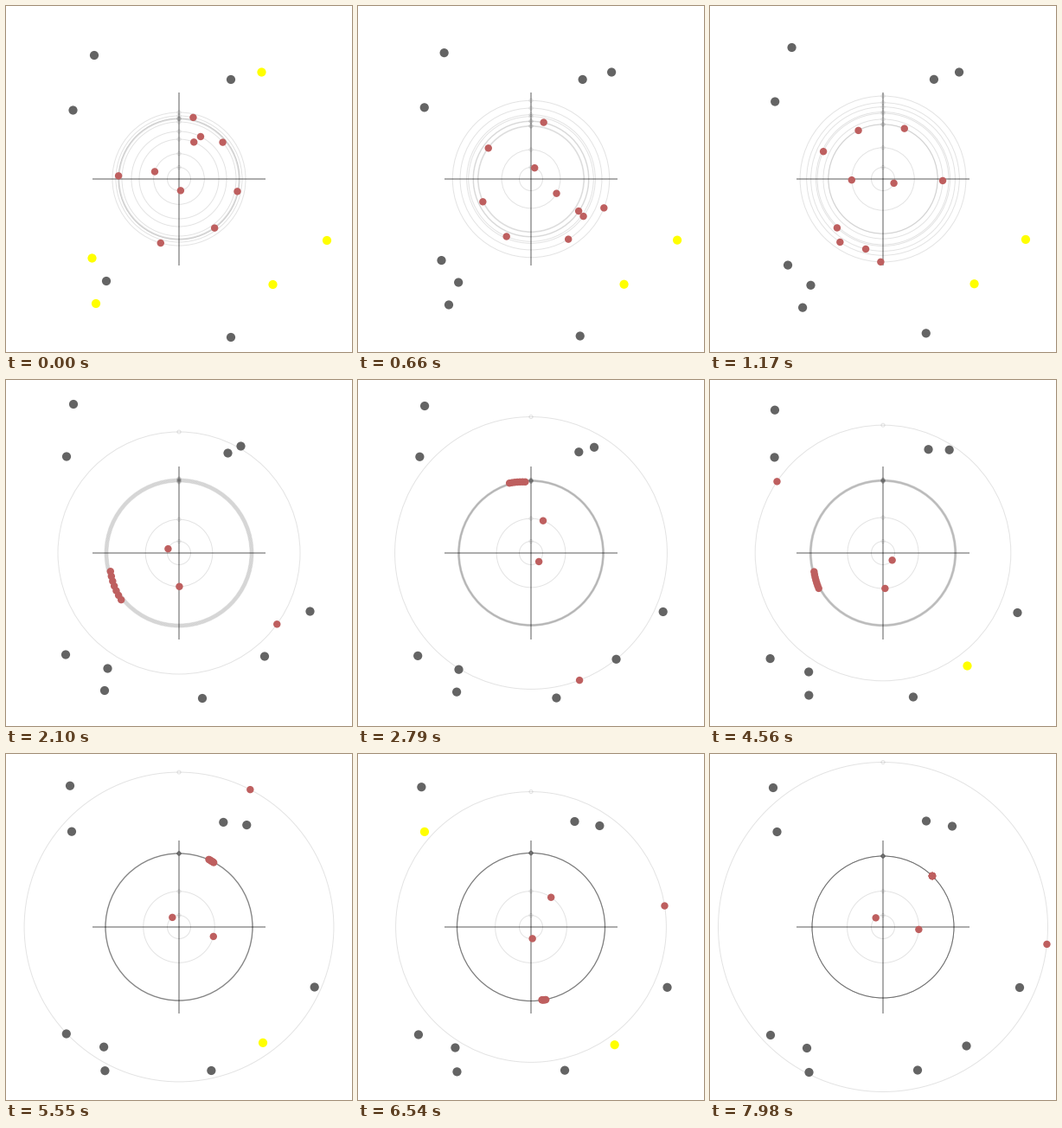
A matplotlib script for the animation above (8000 ms loop, 400x400 px).

```python
import numpy as np
import matplotlib.pyplot as plt
from matplotlib.animation import FuncAnimation
from matplotlib.patches import Circle

SIZE, DPI = 400, 100
PX = 72 / DPI
MID = SIZE / 2
FRAMES, INTERVAL, TICK = 250, 32, 30
SETTLE, END = 2100, 7980

GREY, YELLOW, RED = "#646464", "#ffff00", "#be5f5f"
BEATS = [0, 1170, SETTLE, 3540, 4560, 6540, END]


def curve(times, values):
    """Smooth cubic path through the given keys."""
    times, values = np.array(times, float), np.array(values, float)
    slopes = np.gradient(values, times)

    def at(t):
        i = int(np.clip(np.searchsorted(times, t, "right") - 1, 0, len(times) - 2))
        h = times[i + 1] - times[i]
        u = np.clip((t - times[i]) / h, 0, 1)
        return ((1 + 2 * u) * (1 - u) ** 2 * values[i] + u * (1 - u) ** 2 * h * slopes[i]
                + u * u * (3 - 2 * u) * values[i + 1] + u * u * (u - 1) * h * slopes[i + 1])
    return at


inner_angle = curve(BEATS, [82, 1101, 2001, 3150, 3998, 5843, 7072])
outer_angle = curve(BEATS, [-254, -67, 36, 103, 214, 351, 366])
outer_reach = curve(BEATS[:5] + [5250] + BEATS[5:],
                    [77, 63.4, 140, 155.5, 147.8, 178, 156.4, 190.5])
swarm_angle = curve(BEATS, [-162, 14, 153, 373, 518, 800, 1034])
swarm_reach = curve(BEATS[2:], [84, 83.2, 83.7, 85.5, 82])


# Orbits return angle in degrees (clockwise) and radius in pixels
def inner(t):
    return inner_angle(t), 13.5


def second(t):
    return 197 + 0.2916 * t, 41.5 - 12.2 * np.exp(-t / 1400)


def outer(t):
    return outer_angle(t), outer_reach(t)


def swarm_orbit(lead, offset, start):
    """Starts apart, then joins the bunch; lead runs from -0.5 (tail) to 0.5 (head)."""
    def at(t):
        u = min(t / SETTLE, 1)
        v = max(t - SETTLE, 0) / (END - SETTLE)
        breath = 0.25 + 0.75 * np.cos(np.pi * (t - SETTLE) / 2600) ** 2
        spread = lead * (1 - v) * (breath if v else u ** 4)
        angle = swarm_angle(t) + offset * (1 - u ** 4) + 24 * spread
        swell = 20 * np.sin(np.radians(offset)) * np.sin(np.pi * u)
        reach = start + (swarm_reach(t) - start) * u ** 2 + swell - 4 * spread
        return angle, reach
    return at


members = [(-15, 70), (85, 73), (99, 55), (122, 66), (-266, 46), (-144, 70), (-186, 69)]
orbits = [inner, second, outer]
orbits += [swarm_orbit(0.5 - i / 6, *m) for i, m in enumerate(members)]


def drift(start, settled, end):
    """Speeds up towards the settled place, then eases on to the end."""
    start, settled, end = map(np.array, (start, settled, end))

    def at(t):
        if t < SETTLE:
            return start + (settled - start) * (t / SETTLE) ** 2
        v = (t - SETTLE) / (END - SETTLE)
        return settled + (end - settled) * np.sin(np.pi * v / 2)
    return at


drifters = [
    drift((102, 57), (78, 28), (73, 39)),
    drift((77.5, 120.5), (70, 88.5), (77.5, 90)),
    drift((260, 85), (256.5, 84.5), (250, 77.5)),
    drift((295.5, 76.5), (271.5, 76.5), (280, 83.5)),
    drift((371, 271), (351.5, 267.5), (358, 270)),
    drift((308.5, 322), (299, 319.5), (296.5, 337.5)),
    drift((260, 383), (227, 368), (240, 365.5)),
    drift((99.5, 291.5), (69, 317.5), (70, 325)),
    drift((116, 318), (117.5, 333.5), (112, 340)),
    drift((104, 344), (114, 359), (114.5, 368)),
]
# Yellow spans: drifter, from, to
LIT = [(3, 0, 500), (7, 0, 500), (9, 0, 600), (4, 0, 1500), (5, 0, 1600),
       (5, 3300, 6900), (1, 6400, 6720)]

fig = plt.figure(figsize=(SIZE / DPI, SIZE / DPI), dpi=DPI, facecolor="white")
ax = fig.add_axes([0, 0, 1, 1])
ax.set_xlim(0, SIZE)
ax.set_ylim(SIZE, 0)
ax.axis("off")


def outline(radius):
    return ax.add_patch(Circle((MID, MID), radius, fill=False, ec=(0, 0, 0, 0.11),
                               lw=PX, zorder=1))


def dot(radius, color, z):
    return ax.add_patch(Circle((MID, MID), radius, fc=color, lw=0, zorder=z))


rings = [outline(10) for _ in orbits]
marks = [outline(2) for _ in orbits]
movers = [dot(4.2, RED, 4) for _ in orbits]
walkers = [dot(5.1, GREY, 3) for _ in drifters]

for xs, ys in [((100, 300), (MID, MID)), ((MID, MID), (100, 300))]:
    ax.plot(xs, ys, color="black", alpha=0.32, lw=2 * PX, zorder=2,
            solid_capstyle="butt", snap=False)


def draw(frame):
    t = TICK * np.ceil(frame * INTERVAL / TICK)
    for orbit, ring, mark, mover in zip(orbits, rings, marks, movers):
        angle, r = orbit(t)
        a = np.radians(angle)
        ring.set_radius(r)
        mark.center = MID, MID - r
        mover.center = MID + r * np.cos(a), MID + r * np.sin(a)
    lit = {i for i, on, off in LIT if on <= t < off}
    for i, (path, walker) in enumerate(zip(drifters, walkers)):
        walker.center = tuple(path(t))
        walker.set_facecolor(YELLOW if i in lit else GREY)
    return rings + marks + movers + walkers


anim = FuncAnimation(fig, draw, frames=FRAMES, init_func=lambda: draw(0),
                     interval=INTERVAL, repeat=True, repeat_delay=0, blit=False)
plt.show()
```
